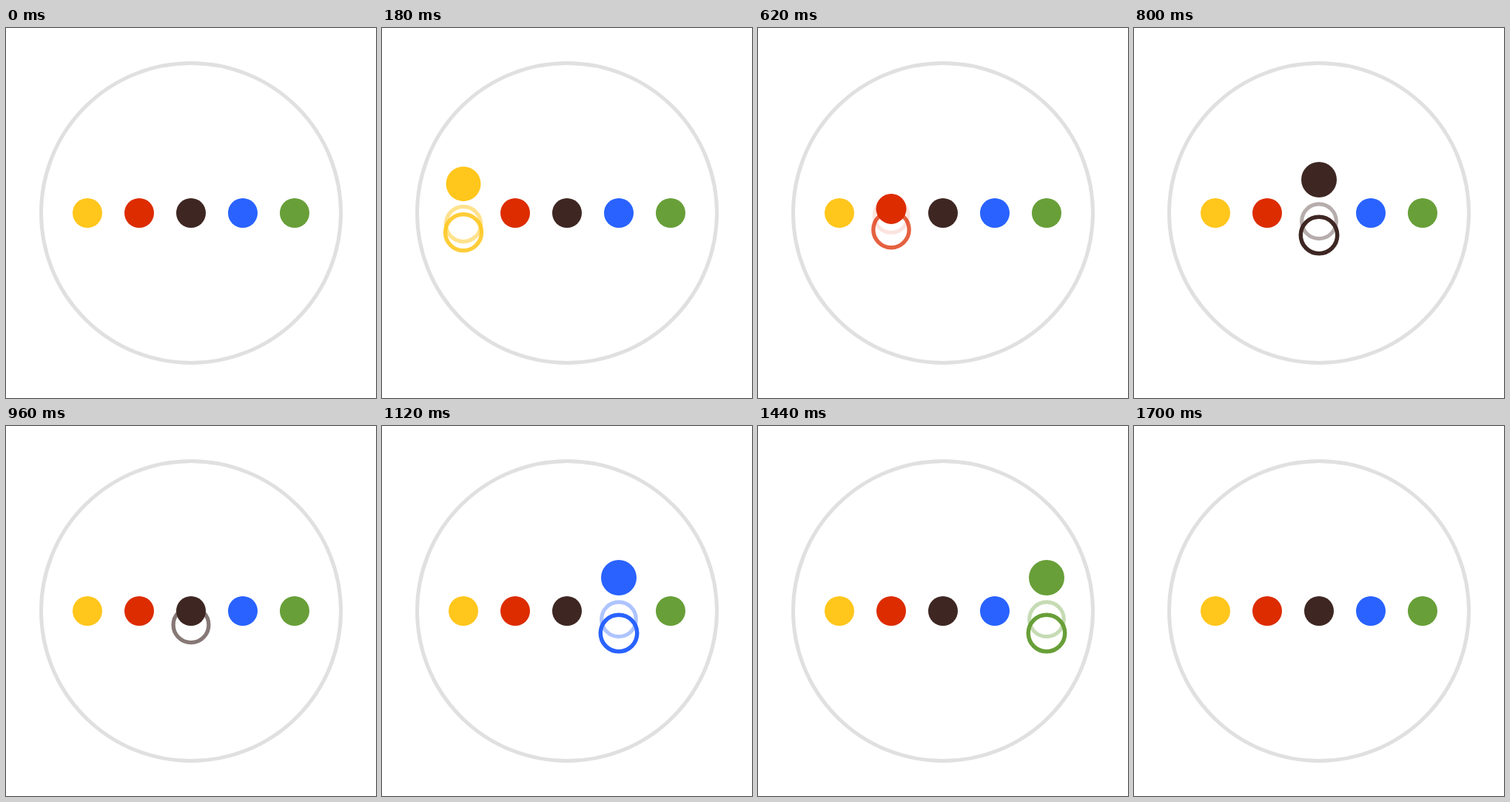
An HTML page for the animation above (1.8 s loop, 500 by 500 pixels).

```html
<!DOCTYPE html>
<html lang="en">
<head>
<meta charset="utf-8">
<title>Bouncing dots</title>
<style>
  html, body { margin: 0; width: 100%; height: 100%; overflow: hidden; background: #fff; }
  svg { display: block; width: 500px; height: 500px; }
</style>
</head>
<body>
<svg id="stage" viewBox="0 0 500 500">
  <circle cx="250" cy="250" r="202.5" fill="none" stroke="#e0e0e0" stroke-width="5"/>
</svg>
<script>
  const LOOP = 1800, TICK = 20, HALF = 160, STAGGER = 320, ECHO = 100;
  const COLORS = ['#ffc61c', '#dd2c00', '#3e2723', '#2962ff', '#689f38'];
  const stage = document.getElementById('stage');

  function circle(attrs) {
    const el = document.createElementNS('http://www.w3.org/2000/svg', 'circle');
    set(el, attrs);
    return stage.appendChild(el);
  }

  function set(el, attrs) {
    for (const key in attrs) el.setAttribute(key, attrs[key]);
  }

  // Linear rise and fall: 0 -> 1 -> 0 over two halves
  const bounce = t => Math.max(0, 1 - Math.abs(t - HALF) / HALF);

  const groups = COLORS.map((color, i) => {
    const cx = 110 + i * 70;
    const ring = () => circle({ cx, fill: 'none', stroke: color });
    return { rings: [ring(), ring()], dot: circle({ cx, fill: color }) };
  });

  function draw(time) {
    groups.forEach(({ rings, dot }, i) => {
      const local = time - i * STAGGER;
      const lift = bounce(local);
      set(dot, { cy: 250 - 45 * lift, r: 20 + 4 * lift });
      rings.forEach((ring, k) => {
        const p = bounce(local - k * ECHO);
        const scale = 1 + 0.1 * p;
        set(ring, {
          cy: 250 + 30 * p,
          r: 22.5 * scale,
          'stroke-width': 5 * scale,
          opacity: p
        });
      });
    });
  }

  const start = performance.now();
  function frame() {
    const time = (performance.now() - start) % LOOP;
    draw(Math.floor(time / TICK) * TICK);
    requestAnimationFrame(frame);
  }
  frame();
</script>
</body>
</html>
```
